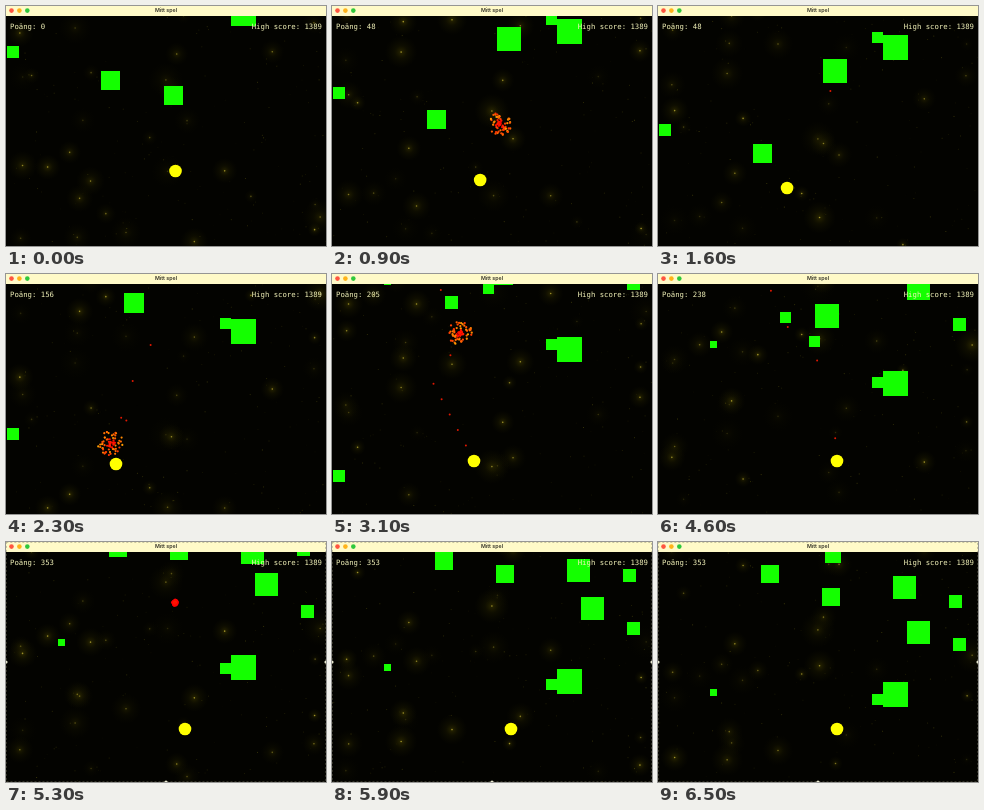
Write an HTML page with a canvas that moves like this. It is 320x240 px and loops after 6600 ms.

```html
<!DOCTYPE html>
<html lang="sv">
<head>
<meta charset="utf-8">
<title>Mitt spel</title>
<style>
html, body { margin: 0; width: 100%; height: 100%; overflow: hidden; background: #000; }
canvas { display: block; width: 320px; height: 240px; }
</style>
</head>
<body>
<canvas id="stage"></canvas>
<script>
const W = 320, H = 240, BAR = 10, LOOP = 6600, STEP = 100;
const SHOT_SPEED = 0.16, BLAST_LIFE = 500;
const canvas = document.getElementById('stage');
const ratio = window.devicePixelRatio || 1;
canvas.width = W * ratio;
canvas.height = H * ratio;
const ctx = canvas.getContext('2d');
ctx.scale(ratio, ratio);

function random(seed) {
  let s = seed;
  return () => {
    s = (s * 1664525 + 1013904223) >>> 0;
    return s / 4294967296;
  };
}

function disc(x, y, r, color) {
  ctx.fillStyle = color;
  ctx.beginPath();
  ctx.arc(x, y, r, 0, Math.PI * 2);
  ctx.fill();
}

// a block falls from under the bar at a steady speed until it is hit
function block(x, size, enter, speed, hit = Infinity) {
  const top = t => BAR - size + (t - enter) * speed / 1000;
  return { x, size, hit, top, points: Math.round(size * 2.5) };
}

const blocks = [
  block(1, 11.5, -671, 52.5),
  block(95, 19.2, -1383, 49.5, 2030),
  block(158, 19.2, -1562, 53, 655),
  block(225, 25, -343, 22.7),
  block(214, 11, 549, 25.7),
  block(165, 24, 139, 46, 1700),
  block(118, 19.6, 1763, 54, 2850),
  block(113, 13.2, 2350, 34, 3370),
  block(151, 10.8, 2814, 35, 4700),
  block(157, 24, 3061, 28.6, 5250),
  block(122, 11.2, 3283, 30, 4650),
  block(52, 7, 3067, 42),
  block(295, 13, 2896, 27.5),
  block(103, 18, 5071, 21.7),
  block(164, 18, 5079, 38),
  block(235, 23, 4879, 29),
  block(291, 13, 5198, 43),
  block(249, 23, 4200, 40),
  block(167, 16, 6225, 40)
];
const targets = blocks.filter(b => b.hit < LOOP);
const centre = (b, t) => [b.x + b.size / 2, b.top(t) + b.size / 2];

const path = [[117, 169.5, 165], [2300, 110, 190], [2400, 114, 187], [4025, 179, 187]];

function shipAt(t) {
  let i = 1;
  while (i < path.length - 1 && path[i][0] < t) i++;
  const [t0, x0, y0] = path[i - 1], [t1, x1, y1] = path[i];
  const k = Math.min(1, Math.max(0, (t - t0) / (t1 - t0)));
  return [x0 + (x1 - x0) * k, y0 + (y1 - y0) * k];
}

function shot(at, dx, dy, end = Infinity) {
  const k = SHOT_SPEED / Math.hypot(dx, dy);
  return { at, vx: dx * k, vy: dy * k, end };
}

// fire early enough to meet the block at its hit time
function aimedShot(b) {
  const [x, y] = centre(b, b.hit);
  let at = b.hit, dx, dy;
  for (let i = 0; i < 6; i++) {
    const [sx, sy] = shipAt(at);
    dx = x - sx;
    dy = y - sy;
    at = b.hit - Math.hypot(dx, dy) / SHOT_SPEED;
  }
  return shot(at, dx, dy, b.hit);
}

const shots = targets.map(aimedShot);
for (let i = 0; i < 3; i++) shots.push(shot(1600 + i * 215, 0.14 - i * 0.095, -1));
for (let t = 2600; t <= 3500; t += 100) shots.push(shot(t, -0.265, -1));

const rnd = random(77);
const sky = Array.from({ length: 190 }, (_, i) => ({
  x: rnd() * W, y: rnd() * H,
  speed: 0.02 + rnd() * 0.02,
  phase: rnd() * Math.PI * 2,
  power: 0.12 + rnd() * 0.2,
  glow: i < 30 ? 6 + rnd() * 12 : 0
}));

function drawGlow(x, y, r, alpha) {
  const g = ctx.createRadialGradient(x, y, 0, x, y, r);
  g.addColorStop(0, `rgba(100,92,0,${alpha})`);
  g.addColorStop(0.4, `rgba(60,56,0,${alpha * 0.5})`);
  g.addColorStop(1, 'rgba(40,38,0,0)');
  ctx.fillStyle = g;
  ctx.fillRect(x - r, y - r, 2 * r, 2 * r);
}

function drawSky(t) {
  ctx.fillStyle = '#030300';
  ctx.fillRect(0, 0, W, H);
  for (const s of sky) {
    const y = (s.y + t * s.speed) % H;
    const twinkle = 0.6 + 0.4 * Math.sin(s.phase + t / 400);
    if (s.glow) {
      drawGlow(s.x, y, s.glow, twinkle * 0.4);
      disc(s.x, y, 0.8, `rgba(240,220,70,${twinkle * 0.6})`);
    } else {
      ctx.fillStyle = `rgba(180,170,30,${s.power * twinkle})`;
      ctx.fillRect(s.x, y, 1, 1);
    }
  }
}

function drawBlock(b, t) {
  const y = Math.round(b.top(t)), size = Math.round(b.size);
  if (t >= b.hit || y + size <= BAR) return;
  ctx.fillStyle = '#14ff00';
  ctx.fillRect(b.x, y, size, size);
}

function drawShot(s, t) {
  if (t < s.at || t >= s.end) return;
  const [x, y] = shipAt(s.at), age = t - s.at;
  disc(x + s.vx * age, y + s.vy * age, 1, '#e01800');
}

// orange sparks fly out around a slow red core
function drawBlast(b, t) {
  const age = t - b.hit;
  if (age < 0 || age > BLAST_LIFE) return;
  const r = random(Math.round(b.hit * 31 + b.x));
  const [cx, cy] = centre(b, b.hit);
  const heat = Math.min(1, Math.max(0, (age - 50) / 150));
  for (let i = 0; i < 70; i++) {
    const core = i >= 48;
    const angle = r() * Math.PI * 2;
    const far = age * (core ? 0.018 * r() : 0.018 + 0.03 * r());
    const hue = core ? r() * 8 : (12 + r() * 26) * heat;
    disc(cx + Math.cos(angle) * far, cy + Math.sin(angle) * far,
      0.5 + 1.3 * (1 - age / BLAST_LIFE), `hsl(${hue},100%,50%)`);
  }
}

function drawText(t) {
  const score = targets.reduce((sum, b) => sum + (b.hit <= t ? b.points : 0), 0);
  ctx.font = '7.3px "DejaVu Sans Mono", monospace';
  ctx.fillStyle = '#f2f2b8';
  ctx.textAlign = 'left';
  ctx.fillText('Poäng: ' + score, 4, 23);
  ctx.textAlign = 'right';
  ctx.fillText('High score: 1389', 316, 23);
}

function drawBar() {
  ctx.fillStyle = '#fffac8';
  ctx.fillRect(0, 0, W, BAR);
  ['#ff5540', '#ffb31a', '#2fc83c'].forEach((color, i) => disc(5.5 + i * 7.9, 4.6, 2.3, color));
  ctx.font = '600 5.3px Inter, sans-serif';
  ctx.fillStyle = '#38362a';
  ctx.textAlign = 'center';
  ctx.fillText('Mitt spel', 160, 6.4);
}

function drawSelection() {
  ctx.strokeStyle = '#77755c';
  ctx.lineWidth = 0.5;
  ctx.setLineDash([2, 2]);
  ctx.strokeRect(0.3, 0.3, W - 0.6, H - 0.6);
  ctx.setLineDash([]);
  for (const [x, y] of [[0, 120], [W, 120], [160, H]]) disc(x, y, 1.6, '#e8e8d0');
}

function draw(time) {
  // the game starts a little sluggishly
  const t = time < 900 ? 117 + time * 0.87 : time;
  drawSky(t);
  blocks.forEach(b => drawBlock(b, t));
  shots.forEach(s => drawShot(s, t));
  targets.forEach(b => drawBlast(b, t));
  disc(...shipAt(t), 6.3, '#ffff00');
  drawText(t);
  drawBar();
  if (t >= 5000) drawSelection();
}

const start = performance.now();
function tick() {
  const time = (performance.now() - start) % LOOP;
  draw(Math.floor(time / STEP) * STEP);
  requestAnimationFrame(tick);
}
tick();
</script>
</body>
</html>
```
